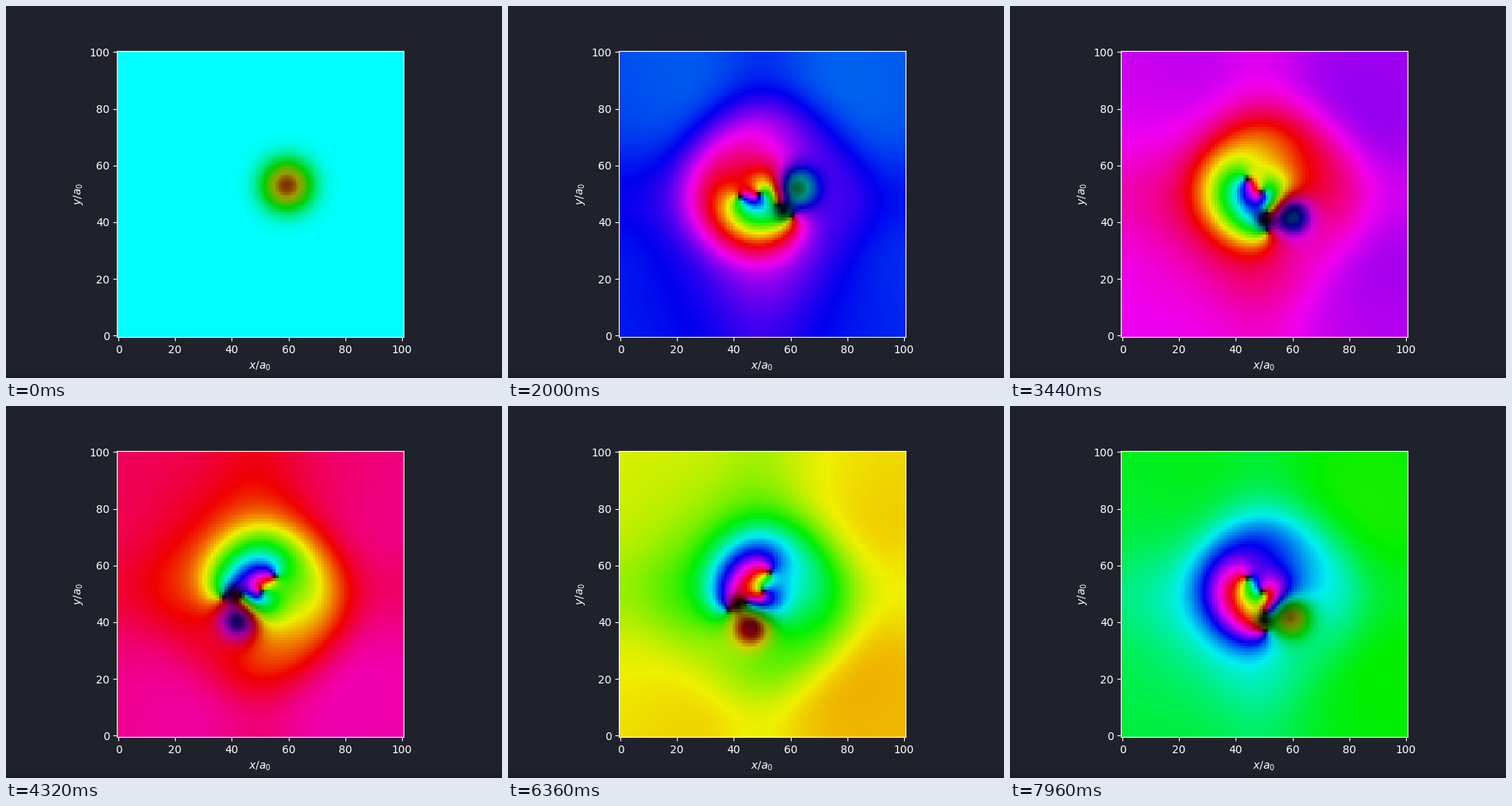
A matplotlib script for the animation above (8000 ms loop, 640 px wide and 480 px high).

```python
import numpy as np
import matplotlib.pyplot as plt
from matplotlib.animation import FuncAnimation
from matplotlib.patches import Rectangle

N, FRAMES = 101, 200
TURN, START = 0.5, 0.3        # orbit of the dark spot, radians
DRIFT, LAG = 1.744, 42        # hue rotation per frame and its delay, degrees
BACK, INK = "#1f222a", "white"

y, x = np.mgrid[:N, :N] - N // 2
z = x + 1j * y
r = np.abs(z)

# Radial hue lead: logarithmic near the middle, flat in the corners
depth = (2 - np.cos(2 * np.pi * x / N) - np.cos(2 * np.pi * y / N)) / 4


def softplus(v, width):
    return width * np.logaddexp(0, v / width)


LEAD = 75 * softplus(-np.log(depth + 0.012) - 0.52, 0.15)


def polar(radius, degrees):
    return radius * np.exp(1j * np.radians(degrees))


def bump(w, centre, size):
    return np.exp(-np.abs(w - centre) ** 2 / size)


def field(n):
    """Hue in degrees and brightness, built in the frame of the moving spot."""
    grow = 1 - np.exp(-n / 8)
    w = z * np.exp(-1j * (TURN * n + START))
    spot = 9.85 + 1.85 * grow
    dip = bump(w, spot, 66 - 21 * grow)

    hue = 180 + softplus(grow * LEAD + DRIFT * n - LAG, 10)
    arm = np.angle(w) + np.radians(5.5) * (r - 14)
    hue -= grow * 30 * np.exp(-((r - 18) / 14) ** 2) * np.cos(arm)
    hue -= 157 * dip
    light = (1 - 0.06 * grow) * (1 - (0.5 + 0.1 * grow) * dip)
    light *= 1 - 0.95 * grow * bump(w, polar(9.5, -48), 11)

    # Two vortex pairs: behind the spot and across the middle
    pairs = [(polar(7, -46), polar(13, -46)), (polar(8, 178), polar(1, 178))]
    for plus, minus in pairs:
        minus = plus + grow * (minus - plus)
        twist = (w - plus) * np.conj(w - minus)
        hue += np.degrees(np.angle(twist))
        for core in (plus, minus):
            light *= 1 - 0.9 * grow * bump(w, core, 1.2)
    return hue, light


def colour(n):
    hue, light = field(n)
    ramp = [np.clip(np.abs((hue / 60 + k) % 6 - 3) - 1, 0, 1)
            for k in (0, 4, 2)]
    return np.stack(ramp, axis=-1) * light[..., None]


fig, ax = plt.subplots(figsize=(6.4, 4.8), dpi=100, facecolor=BACK)
fig.add_artist(Rectangle((0, 0), 1, 4 / 480, transform=fig.transFigure,
                         color="#1f1b24", lw=0))
image = ax.imshow(colour(0), origin="lower", interpolation="nearest")
ax.set_xlabel("$x/a_0$", color=INK)
ax.set_ylabel("$y/a_0$", color=INK)
ax.tick_params(colors=INK)
ax.spines[:].set_color(INK)


def draw(n):
    image.set_data(colour(n))
    return [image]


anim = FuncAnimation(fig, draw, frames=FRAMES, interval=40, blit=True,
                     repeat=True, repeat_delay=0)
plt.show()
```
